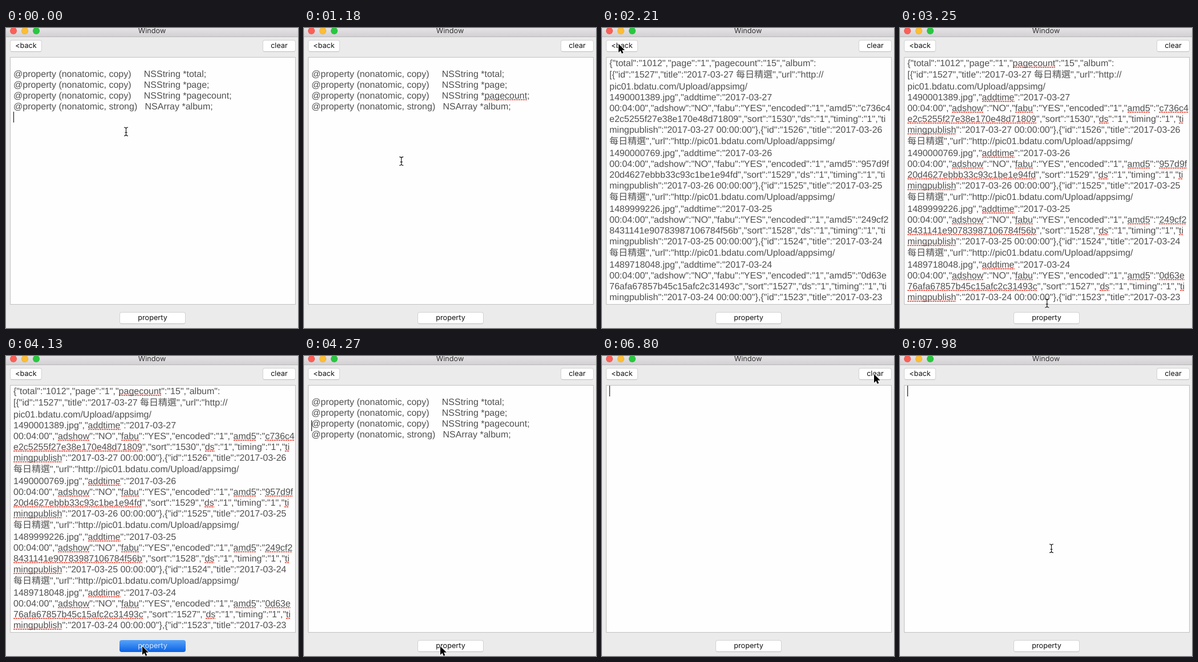
An HTML page that plays this animation: 512 px wide and 527 px high, repeating every 8 s.

```html
<!DOCTYPE html>
<html lang="en">
<head>
<meta charset="utf-8">
<title>Window</title>
<style>
  html, body { margin: 0; width: 100%; height: 100%; overflow: hidden; }
  body { position: relative; background: #ebebeb; text-rendering: geometricPrecision; cursor: default; }
  body > * { position: absolute; box-sizing: border-box; }
  .bar, .button { font: 12.7px Inter, "Open Sans", sans-serif; text-align: center; white-space: pre; }
  .bar { left: 0; top: 0; width: 512px; height: 16px; line-height: 12px; color: #333;
         background: linear-gradient(#e5e3e5, #d2d0d2); border-bottom: 1px solid #b9b8b9; }
  .light { top: -1px; width: 12px; height: 12px; border-radius: 50%; box-shadow: inset 0 0 0 .5px #0002; }
  .button { height: 21px; line-height: 19px; color: #111; background: #fff border-box; border-radius: 4px;
            border: 1px solid #d2d2d2; border-bottom-color: #bcbcbc; }
  .button.pressed { color: #d9e9ff; background: linear-gradient(#57a3f9, #0a62e4) border-box; border-color: transparent; }
  .field { left: 7px; top: 51px; width: 501px; height: 435px; background: #fefefe; border: 1px solid #c1c1c1; }
  .text { left: 13px; top: 53px; font: 16px/19px "Liberation Sans", "Noto Sans CJK TC", "Noto Sans CJK SC", sans-serif;
          white-space: pre; color: #505050; }
  .text div { height: 19px; }
  .text .tall { margin: 1px 0 2px; }
  u { text-decoration: none; }
  .checked u { background: repeating-linear-gradient(90deg, #f2685c 0 3px, #f2685c22 3px 4px) 0 14px / 100% 2px no-repeat; }
  #caret { left: 13px; width: 1px; height: 19px; background: #000; }
  #pointer { left: 0; top: 0; width: 512px; height: 527px; }
</style>
</head>
<body>
<div class="bar">Window</div>
<div class="light" style="left:7px;background:#fb5f57"></div>
<div class="light" style="left:27px;background:#fdbd35"></div>
<div class="light" style="left:47px;background:#29c740"></div>
<div class="button" id="back" style="left:7px;top:21px;width:56px">&lt;back</div>
<div class="button" id="clear" style="left:450px;top:21px;width:58px">clear</div>
<div class="button" id="property" style="left:199px;top:499px;width:116px">property</div>
<div class="field"></div>
<div class="text" id="properties"></div>
<div class="text" id="json"></div>
<div id="caret"></div>
<svg id="pointer" viewBox="0 0 512 527">
  <path id="arrow" d="M0 0V15l3.5-3.2 2.3 5 2.6-1.1-2.3-4.9h4.8z" stroke="#fff" paint-order="stroke" stroke-width="1.6"/>
  <path id="beam" d="M-3.5-7.5Q-.5-7.5 0-5.5Q.5-7.5 3.5-7.5M0-5.5V5.5M-3.5 7.5Q-.5 7.5 0 5.5Q.5 7.5 3.5 7.5M-2 1.5H2" fill="none" stroke="#111" stroke-width="1.1"/>
</svg>
<script>
const LOOP = 8000;
const $ = id => document.getElementById(id);

const propertyLines = [
  '',
  '@property (nonatomic, copy)     NSString *total;',
  '@property (nonatomic, copy)     NSString *page;',
  '@property (nonatomic, copy)     NSString *pagecount;',
  '@property (nonatomic, strong)   NSArray *album;'
];

// image name and the two wrapped halves of each checksum
const albums = [
  ['1490001389', 'c736c4', 'e2c5255f27e38e170e48d71809'],
  ['1490000769', '957d9f', '20d4627ebbb33c93c1be1e94fd'],
  ['1489999226', '249cf2', '8431141e90783987106784f56b'],
  ['1489718048', '0d63e', '76afa67857b45c15afc2c31493c']
];
const jsonLines = [
  '{"total":"1012","page":"1","pagecount":"15","album":',
  '[{"id":"1527","title":"2017-03-27 每日精選","url":"http://',
  'pic01.bdatu.com/Upload/appsimg/'
];
albums.forEach(([image, hashStart, hashEnd], i) => {
  const date = n => '2017-03-' + (27 - n);
  if (i) jsonLines.push('每日精選","url":"http://pic01.bdatu.com/Upload/appsimg/');
  jsonLines.push(
    `${image}.jpg","addtime":"${date(i)}`,
    `00:04:00","adshow":"NO","fabu":"YES","encoded":"1","amd5":"${hashStart}`,
    `${hashEnd}","sort":"${1530 - i}","ds":"1","timing":"1","ti`,
    `mingpublish":"${date(i)} 00:00:00"},{"id":"${1526 - i}","title":"${date(i + 1)}`
  );
});

const misspelled = /pagecount|addtime|adshow|fabu|amd5|ds(?=")|ti$|^mingpublish|^[0-9a-f]{26,}|[0-9a-f]{5,6}$/g;
const render = lines => lines.map(line =>
  `<div${line.includes('每') ? ' class="tall"' : ''}>${line.replace(misspelled, '<u>$&</u>')}</div>`).join('');
$('properties').innerHTML = render(propertyLines);
$('json').innerHTML = render(jsonLines);

// pointer moves: first step, last step, number of steps, destination
const start = [210.5, 182];
const moves = [
  [290, 440, 2, [197, 272]],
  [890, 1920, 8, [29, 28]],
  [2510, 2810, 3, [268, 469]],
  [3100, 3680, 5, [239, 510]],
  [4720, 5020, 3, [406, 176]],
  [5320, 6050, 6, [477, 32]],
  [7240, 7980, 6, [265.5, 338]]
];
const ease = p => p * p * (3 - 2 * p);

function pointerAt(t) {
  let pos = start;
  for (const [from, to, steps, target] of moves) {
    if (t < from) break;
    const step = Math.floor((t - from) / (to - from) * (steps - 1) + 1e-6) + 1;
    const p = ease(Math.min(1, step / steps));
    pos = pos.map((v, i) => v + (target[i] - v) * p);
  }
  return pos;
}

// caret spans: from, to, top
const caretSpans = [
  [0, 890, 147], [1480, 2210, 147],
  [4270, 4720, 113], [5320, 5900, 113],
  [6800, 7390, 52], [7980, LOOP, 52]
];
const within = (t, from, to) => t >= from && t < to;
const show = (id, visible) => { $(id).style.display = visible ? '' : 'none'; };

function draw(t) {
  $('back').classList.toggle('pressed', within(t, 2070, 2210));
  $('property').classList.toggle('pressed', within(t, 4130, 4270));
  $('clear').classList.toggle('pressed', within(t, 6500, 6650));

  show('properties', t < 2210 || within(t, 4270, 6650));
  show('json', within(t, 2210, 4270));
  $('properties').classList.toggle('checked', within(t, 890, 2210));
  $('json').classList.toggle('checked', t >= 3250);

  const caret = caretSpans.find(([from, to]) => within(t, from, to));
  show('caret', caret);
  if (caret) $('caret').style.top = caret[2] + 'px';

  const [x, y] = pointerAt(t);
  const overText = y > 51 && y < 486;
  show('beam', overText);
  show('arrow', !overText);
  $(overText ? 'beam' : 'arrow').setAttribute('transform', `translate(${x} ${y})`);
}

const began = performance.now();
function tick() {
  draw((performance.now() - began) % LOOP);
  requestAnimationFrame(tick);
}
tick();
</script>
</body>
</html>
```
